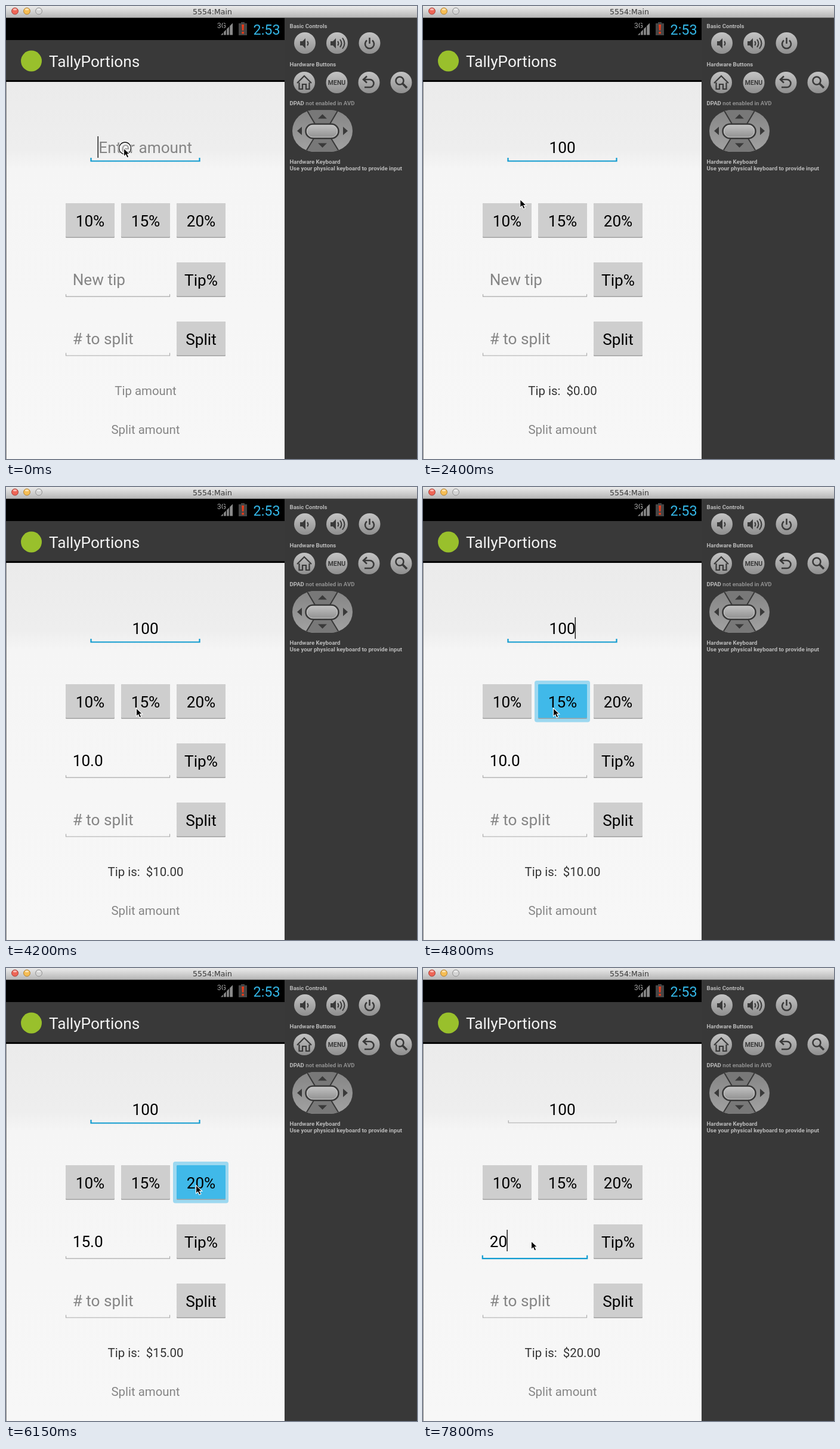
Write an HTML page that moves like this. It is 689 by 758 pixels and loops after 8000 ms.

```html
<!DOCTYPE html>
<html lang="en">
<head>
<meta charset="utf-8">
<title>Tip demo</title>
<style>
html, body { margin: 0; width: 100%; height: 100%; overflow: hidden; background: #383838; }
svg { display: block; width: 100vw; height: 100vh; }
text { font-family: Roboto, sans-serif; white-space: pre; }
.big { font-size: 26.2px; }
.small { font-size: 20.4px; }
.mid { text-anchor: middle; }
.hint { fill: #858585; }
.panel { font-size: 9.65px; font-weight: 700; fill: #b9b9b9; }
.icon { fill: none; stroke: #3a3a3a; stroke-width: 2.6; }
.dark { fill: #3a3a3a; stroke: none; }
.under { fill: none; stroke: #ababab; stroke-width: 1.2; }
.under.on { stroke: #109bd0; stroke-width: 2.2; }
.caret { fill: #222; }
</style>
</head>
<body>
<svg viewBox="0 0 689 758" preserveAspectRatio="none">
  <defs>
    <linearGradient id="chrome" x2="0" y2="1">
      <stop stop-color="#ebebeb"/><stop offset="1" stop-color="#b4b4b4"/>
    </linearGradient>
    <linearGradient id="page" x2="0" y2="1">
      <stop stop-color="#ebebeb"/><stop offset=".18" stop-color="#eeeeee"/>
      <stop offset=".23" stop-color="#f5f5f5"/><stop offset="1" stop-color="#f7f7f7"/>
    </linearGradient>
    <linearGradient id="key" x2="0" y2="1">
      <stop stop-color="#c4c4c4"/><stop offset="1" stop-color="#8e8e8e"/>
    </linearGradient>
    <linearGradient id="pad" x2="0" y2="1">
      <stop stop-color="#858585"/><stop offset="1" stop-color="#a2a2a2"/>
    </linearGradient>
    <clipPath id="padClip"><rect x="480" y="174" width="101" height="70" rx="38" ry="35"/></clipPath>
  </defs>

  <!-- window bar -->
  <rect width="689" height="20" fill="url(#chrome)"/>
  <rect y="19" width="689" height="1" fill="#7d7d7d"/>
  <g stroke-width="1">
    <circle cx="15" cy="8.5" r="5.5" fill="#ee6556" stroke="#a5413a"/>
    <circle cx="35" cy="8.5" r="5.5" fill="#f6bd54" stroke="#ae8034"/>
    <circle cx="55" cy="8.5" r="5.5" fill="#d4d4d4" stroke="#8f8f8f"/>
    <g fill="#fff" opacity=".55">
      <ellipse cx="15" cy="5.7" rx="3" ry="1.6"/><ellipse cx="35" cy="5.7" rx="3" ry="1.6"/><ellipse cx="55" cy="5.7" rx="3" ry="1.6"/>
    </g>
  </g>
  <text class="mid" x="346" y="14" fill="#383838" style="font:12.5px 'DejaVu Sans',sans-serif">5554:Main</text>

  <!-- phone -->
  <rect y="20" width="467" height="37" fill="#000"/>
  <rect y="57" width="467" height="68" fill="#393939"/>
  <rect y="124" width="467" height="3" fill="#060606"/>
  <rect y="127" width="467" height="631" fill="url(#page)"/>
  <rect y="127" width="1" height="631" fill="#8c8c8c"/>
  <text x="354" y="36.5" font-size="12" fill="#a5a5a5">3G</text>
  <path d="M360 48.5L380 28.5V48.5Z" fill="#8a8a8a"/>
  <path d="M364.5 28V49M369.5 28V49M374.5 28V49" stroke="#000" stroke-width="1.3"/>
  <path d="M390 29h4v-2h6v2h4v20h-14z" fill="#454545"/>
  <path d="M395.2 31h3.8l-.7 10h-2.4zM395.4 43h3.4v3.6h-3.4z" fill="#ee3a18"/>
  <text x="414.5" y="48" font-size="23.4" fill="#33b5e5">2:53</text>
  <circle cx="42.5" cy="92" r="17.5" fill="#99c02c"/>
  <text class="big" x="72" y="101.5" fill="#f3f3f3">TallyPortions</text>

  <path id="amountLine" class="under"/>
  <path id="tipLine" class="under"/>
  <path class="under" d="M100.5 580.5V585H274.5V580.5"/>
  <text id="amount" class="big mid" x="233.7" y="246"></text>
  <text id="tip" class="big" x="111.7" y="466.5"></text>
  <text class="big hint" x="111.7" y="565.5"># to split</text>
  <g id="buttons"></g>
  <text id="total" class="small mid" x="234" y="651"></text>
  <text class="small mid hint" x="234" y="715.5">Split amount</text>
  <rect id="caret" class="caret" width="1.5" height="36"/>
  <path id="handle" d="M162 477L181.5 497V532Q181.5 535 178.5 535H145.5Q142.5 535 142.5 532V497Z" fill="#33b5e5" opacity=".9"/>

  <!-- side panel -->
  <rect x="467" y="20" width="222" height="738" fill="#383838"/>
  <g class="panel">
    <text x="475.5" y="37">Basic Controls</text>
    <text x="475.5" y="100.5">Hardware Buttons</text>
    <text x="475.5" y="166">DPAD <tspan fill="#8f8f8f">not enabled in AVD</tspan></text>
    <text x="475.5" y="264">Hardware Keyboard</text>
    <text x="475.5" y="275">Use your physical keyboard to provide input</text>
  </g>
  <g id="keys"></g>
  <g class="icon">
    <path class="dark" d="M493 59h4l5-5v17l-5-5h-4zM544 59h4l5-5v17l-5-5h-4z"/>
    <path d="M505 59q3 3.5 0 7M556 59q3 3.5 0 7M560 56q5 6.500 0 13M564 53.500q7 9 0 18" stroke-width="2"/>
    <path d="M605 57.500a7.500 7.500 0 1 0 9 0M609.500 53V63"/>
    <path d="M488 129L500 117L512 129M491.500 128V139H497V131H503V139H508.500V128" stroke-width="2.200"/>
    <path d="M600 123H610a6.500 6.500 0 0 1 0 13H601M605 117.500L599 123L605 128.500"/>
    <circle cx="660" cy="125" r="6.500"/>
    <path d="M665 130L672 137" stroke-width="3.500"/>
  </g>
  <text class="mid" x="554.500" y="132" font-size="10.500" font-weight="700" fill="#3a3a3a">MENU</text>
  <g clip-path="url(#padClip)">
    <rect x="480" y="174" width="101" height="70" fill="url(#pad)"/>
    <path d="M503 172L519 199H542L558 172ZM501 246L517 220H544L560 246Z" fill="#787878"/>
    <path d="M503 172L519 199M558 172L542 199M501 246L517 220M560 246L544 220" stroke="#383838" stroke-width="2"/>
  </g>
  <rect x="502.500" y="197.500" width="55" height="24" rx="12" fill="url(#key)" stroke="#383838" stroke-width="2.500"/>
  <rect x="504.500" y="199.500" width="51" height="20" rx="10" fill="none" stroke="#c9c9c9"/>
  <path class="dark" d="M523 188.500L530.500 181L538 188.500ZM523 229.500H538L530.500 237ZM496 202V216L488 209ZM565 202V216L573 209Z"/>

  <g id="mouse">
    <g id="ring" fill="none">
      <circle cx="2" r="10" fill="#fff" fill-opacity=".25" stroke="#fff" stroke-width="3"/>
      <circle cx="2" r="10" stroke="#111" stroke-width="1.300"/>
    </g>
    <path d="M0 0V13.800L3.200 10.900L5.500 16L8.300 14.800L6 9.900H10.300Z" fill="#000" stroke="#fff" stroke-width="1.100"/>
  </g>
</svg>
<script>
const LOOP = 8000, STEP = 150;
const $ = id => document.getElementById(id);

$('keys').innerHTML = [[501, 62], [555, 62], [609.5, 62], [500, 128], [554.5, 128], [608.5, 128], [662.5, 128]]
  .map(([x, y]) => `<circle cx="${x}" cy="${y}" r="18" fill="url(#key)"/>`).join('');

const buttons = [['10%', 100, 330], ['15%', 193, 330], ['20%', 286, 330], ['Tip%', 286, 429], ['Split', 286, 528]];
$('buttons').innerHTML = buttons.map(([label, x, y]) => `
  <g><rect class="halo" x="${x - 6}" y="${y - 6}" width="93" height="69.500" rx="4" fill="#9dd8f0"/>
  <rect x="${x}" y="${y}" width="82" height="58" rx="1.500" fill="#a3a3a3"/>
  <rect class="face" x="${x}" y="${y}" width="82" height="56.500" rx="1.500"/>
  <text class="big mid" x="${x + 41}" y="${y + 38.5}">${label}</text></g>`).join('');
const faces = [...document.querySelectorAll('.face')];
const halos = [...document.querySelectorAll('.halo')];

// Each track lists [start time, value].
const amount = [[0, ''], [450, '1'], [1350, '10'], [1650, '100']];
const tip = [[0, ''], [3300, '10.0'], [4950, '15.0'], [6300, '20.0'], [7650, '20.'], [7800, '20']];
const total = [[0, ''], [450, '0.00'], [3300, '10.00'], [4950, '15.00'], [6300, '20.00']];
const pressed = [[0, -1], [3000, 0], [3450, -1], [4350, 1], [5100, -1], [5700, 2], [6450, -1]];
const ring = [[0, 1], [150, 0], [3000, 1], [3150, 0], [4350, 1], [4800, 0], [5700, 1], [6150, 0], [6750, 1], [6900, 0]];
const caret = [[0, 1], [900, 0], [1350, 1], [2100, 0], [2700, 1], [3150, 0], [3750, 1], [4200, 0],
  [4800, 1], [5250, 0], [5700, 1], [6150, 0], [6750, 1], [7500, 0], [7650, 1]];
// Pointer moves: start, end, target x, y.
const moves = [[1950, 2700, 144, 370], [3600, 3900, 218.5, 370], [4950, 5550, 318.5, 363.5], [6150, 6600, 181.5, 457]];

const at = (track, t) => track.filter(([start]) => start <= t).pop()[1];
const show = (el, on) => el.setAttribute('visibility', on ? 'visible' : 'hidden');

function setText(el, value, hint) {
  const s = value || hint;
  if (el.textContent !== s) el.textContent = s;
  el.classList.toggle('hint', !value);
}

function underline(el, left, right, y, on) {
  el.classList.toggle('on', on);
  const d = on ? 0 : 0.7, rise = on ? 5.5 : 4;
  el.setAttribute('d', `M${left + d} ${y - rise}V${y}H${right - d}V${y - rise}`);
}

function pointer(t) {
  let x = 197.5, y = 238;
  for (const [start, end, toX, toY] of moves) {
    const p = Math.min(1, Math.max(0, (t - start) / (end - start)));
    const k = p * p * (3 - 2 * p);
    x += (toX - x) * k;
    y += (toY - y) * k;
  }
  return [x, y];
}

function draw(now) {
  const t = Math.floor(now % LOOP / STEP) * STEP;
  const sum = at(amount, t), rate = at(tip, t), cash = at(total, t), down = at(pressed, t);
  const onTip = t >= 6750;

  setText($('amount'), sum, 'Enter amount');
  setText($('tip'), rate, 'New tip');
  setText($('total'), cash && `Tip is:\u00a0 $${cash}`, 'Tip amount');
  $('total').style.fill = cash ? '#333' : '';
  underline($('amountLine'), 142.5, 324.500, onTip ? 259 : 259.5, !onTip);
  underline($('tipLine'), 99.8, 275.2, 486.2, onTip);

  const digit = 14.7;
  const caretX = onTip ? 111.5 + digit * rate.replace('.', '').length + (rate.includes('.') ? 6.7 : 0)
    : sum ? 233 + digit * sum.length / 2 : 154;
  $('caret').setAttribute('x', caretX - 0.5);
  $('caret').setAttribute('y', onTip ? 438 : 218);
  show($('caret'), at(caret, t));
  show($('handle'), t >= 7050 && t < 7650);

  faces.forEach((face, i) => {
    face.setAttribute('fill', i === down ? '#40b9e9' : '#cecece');
    show(halos[i], i === down);
  });
  $('mouse').setAttribute('transform', `translate(${pointer(t)})`);
  show($('ring'), at(ring, t));
}

function tick(now) {
  draw(now);
  requestAnimationFrame(tick);
}
draw(0);
requestAnimationFrame(tick);
</script>
</body>
</html>
```
